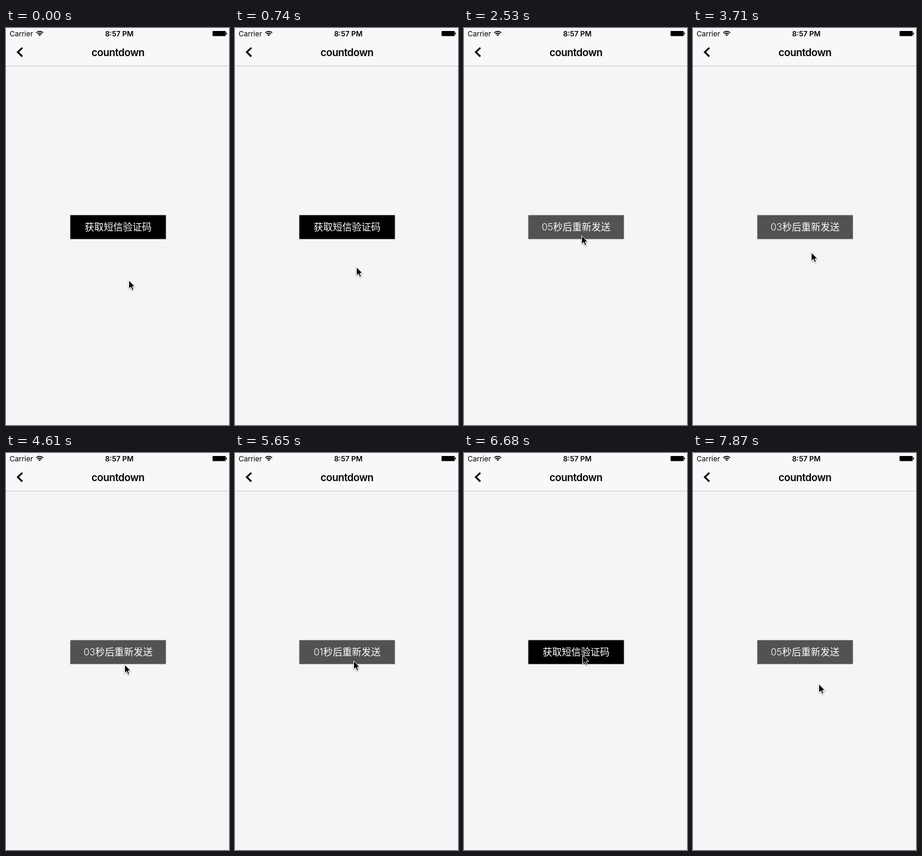
Recreate the animation shown at these times as an HTML page. Size 373 by 663 pixels, loop 8000 ms.

```html
<!DOCTYPE html>
<html lang="zh-CN">
<head>
<meta charset="utf-8">
<title>countdown</title>
<style>
  html, body { margin: 0; width: 100%; height: 100%; overflow: hidden; background: #f4f5f7; }
  svg { display: block; width: 373px; height: 663px; font-family: Inter, "Noto Sans CJK SC", "Noto Sans CJK", sans-serif; }
  #label { font-size: 16px; font-weight: 300; fill: #fff; }
  #cursor { filter: drop-shadow(0 1px 1px rgba(0, 0, 0, .35)); }
</style>
</head>
<body>
<svg viewBox="0 0 373 663">
  <rect width="373" height="63" fill="#f7f8fa"/>
  <rect y="63" width="373" height="1" fill="#c6c7c9"/>

  <text x="6" y="13.7" font-size="12">Carrier</text>
  <g fill="none" stroke="#000" stroke-width="1.7">
    <path d="M50.6 8a8.2 8.2 0 0 1 11.6 0M52.7 10.2a5.2 5.2 0 0 1 7.4 0"/>
    <path d="M56.4 13.6l-2-2a2.8 2.8 0 0 1 4 0z" fill="#000" stroke="none"/>
  </g>
  <text x="189.5" y="13.7" font-size="12" font-weight="600" text-anchor="middle">8:57 PM</text>
  <rect x="345.5" y="5" width="22" height="8.5" rx="1"/>
  <rect x="368" y="7.5" width="1.5" height="3.5" rx=".7"/>

  <path d="M27.3 33L19.8 40.3L27.3 47.6" fill="none" stroke="#000" stroke-width="3"/>
  <text x="187.3" y="47" font-size="17" font-weight="600" letter-spacing="-.41" text-anchor="middle">countdown</text>

  <rect id="button" x="107.5" y="312.5" width="160" height="40"/>
  <text id="label" x="187.5" y="338.2" text-anchor="middle"></text>

  <path id="cursor" d="M.5.8V15.2L3.8 12.1L6.1 17.3L8.5 16.3L6.3 11.2H10.6Z" stroke="#fff"/>
</svg>
<script>
const LOOP = 8000;
const [button, label, cursor] = ['button', 'label', 'cursor'].map(id => document.getElementById(id));

// Seconds left from each time on; 0 means ready to send.
const counts = [[0, 0], [1780, 5], [2820, 4], [3710, 3], [4750, 2], [5650, 1], [6680, 0], [7420, 5]];

const linear = p => p;
const easeOut = p => 1 - (1 - p) ** 2;
const smooth = p => p * p * (3 - 2 * p);

// Pointer moves: first step, last step, number of steps, end x, end y, easing
const start = [205, 420.5];
const moves = [
  [300, 300, 1, 205, 420, linear],
  [590, 1330, 6, 196, 336.5, smooth],
  [2530, 2970, 4, 197.5, 374, linear],
  [4310, 4750, 4, 198, 351, easeOut],
  [5200, 5200, 1, 198, 350, linear],
  [5500, 6380, 7, 198, 337, linear],
  [7870, 7870, 1, 210, 385, linear],
];

function pointer(t) {
  let [x, y] = start;
  for (const [from, to, steps, endX, endY, ease] of moves) {
    if (t < from) break;
    const gap = (to - from) / (steps - 1) || 1;
    const step = Math.min(steps, Math.floor((t - from + 4) / gap) + 1);
    const p = ease(step / steps);
    x += (endX - x) * p;
    y += (endY - y) * p;
  }
  return [x, y];
}

function draw(now) {
  const t = now % LOOP;
  const left = counts.findLast(([time]) => t >= time)[1];
  const text = left ? `0${left}秒后重新发送` : '获取短信验证码';
  if (label.textContent !== text) label.textContent = text;
  button.setAttribute('fill', left ? '#525252' : '#000');
  cursor.setAttribute('transform', `translate(${pointer(t)})`);
}

const begin = performance.now();
function tick() {
  draw(performance.now() - begin);
  requestAnimationFrame(tick);
}
tick();
</script>
</body>
</html>
```
